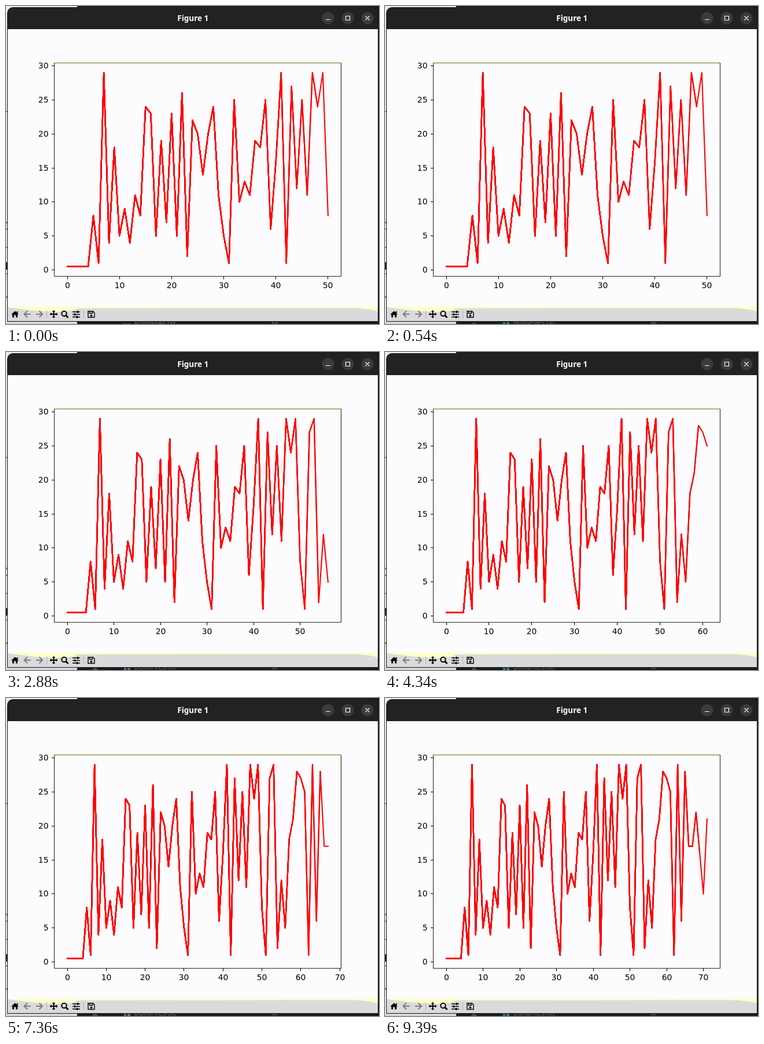
Recreate the animation shown at these times as an HTML page. Size 645x550 px, loop 9.94 s.

```html
<!DOCTYPE html>
<html lang="en">
<head>
<meta charset="utf-8">
<title>Live plot</title>
<style>
  html, body { margin: 0; width: 100%; height: 100%; overflow: hidden; background: #1b1b1d; }
  svg { display: block; }
  .tick { font: 13.9px "DejaVu Sans", sans-serif; fill: #000; }
  .title { font: bold 13.5px "Noto Sans", sans-serif; fill: #fff; }
  .file { font: 12px "Noto Sans", sans-serif; fill: #666; }
</style>
</head>
<body>
<svg width="645" height="550" viewBox="0 0 645 550">
  <!-- desktop behind the window -->
  <rect width="645" height="550" fill="#1b1b1d"/>
  <rect width="123" height="550" fill="#ececf0"/>
  <rect y="546" width="123" height="4" fill="#d6d6da"/>
  <g fill="#222">
    <path d="M0 182h3v1H0zM0 417h3v1H0zM0 463h3v1H0zM0 443h2v13H0z"/>
    <path d="M0 373h3v3H0zM0 502h3v3H0z" fill="#8a8a20"/>
    <path d="M0 385h3v2H0z" fill="#3a8fa0"/>
  </g>
  <g id="behind">
    <circle cx="154" cy="551" r="5" fill="#4a4a50"/>
    <path d="M204 545h4v5h-4zM210 545h5v5h-5z" fill="#3c7686"/>
    <text class="file" x="222" y="549">BuildFiles.txt</text>
    <text class="file" x="459" y="549">M</text>
  </g>

  <!-- window -->
  <path d="M2 546V14Q2 2 14 2H632Q644 2 644 14V546z" fill="#19191a"/>
  <path d="M3 39V14Q3 2 15 2H631Q643 2 643 14V39z" fill="#222223"/>
  <rect x="3" y="40" width="640" height="480" fill="#fcfcfe"/>
  <text class="title" x="323.3" y="26" text-anchor="middle">Figure 1</text>
  <g fill="#3b3b3b">
    <circle cx="557" cy="21" r="10.5"/>
    <circle cx="591" cy="21" r="10.5"/>
    <circle cx="625" cy="21" r="10.5"/>
  </g>
  <path d="M553 23.5h8M587.5 17.5h7v7h-7zM621.5 17.5l7 7m0-7l-7 7" fill="none" stroke="#fff" stroke-width="1.2"/>

  <!-- toolbar -->
  <rect x="3" y="520" width="640" height="25" fill="#ffffc6"/>
  <path d="M3 521Q50 528 90 529Q112 529 125 523L600 522.5Q625 523 643 528V545H3z" fill="#dadadc"/>
  <path d="M70.5 526v14M134.5 526v14" stroke="#b4b4b4"/>
  <path d="M15.5 527.5l6.5 6h-2v5h-3v-4h-3v4h-3v-5h-2zM18.5 528h2v3h-2z"/>
  <g fill="none" stroke="#7c7c7c" stroke-width="2">
    <path id="arrow" d="M37 527.5l-5.5 5.5 5.5 5.5M32 533h10.500"/>
    <use href="#arrow" transform="matrix(-1 0 0 1 94.5 0)"/>
  </g>
  <g fill="none" stroke="#000" stroke-width="2">
    <path d="M78 533h9M82.5 528.5v9"/>
    <circle cx="100.5" cy="532" r="4.2"/>
    <path d="M103.5 535l4 4" stroke-width="2.6"/>
    <path d="M115 529h13M115 533.5h13M115 538h13" stroke-width="1.3"/>
    <path d="M124 527v4M119 531.5v4M123 536v4"/>
    <path d="M142 528h8.5l2.5 2.5v8h-11zM144.500 528v3.5h5V528" stroke-width="1.4"/>
  </g>
  <path d="M82.5 526l2.8 3h-5.6zM82.5 540l2.8-3h-5.6zM75.5 533l3-2.8v5.6zM89.5 533l-3-2.8v5.6z"/>
  <circle cx="147.5" cy="535.5" r="1.9"/>

  <!-- plot -->
  <g id="line" fill="none" stroke="#f00" stroke-width="2.08" stroke-linejoin="round" stroke-linecap="square"></g>
  <path d="M83.5 98.5V467.5H579.5V98.5" fill="none" stroke="#2a2a14" stroke-width="1.1"/>
  <path d="M83 98.5H580" stroke="#6c6c08" stroke-width="1.1"/>
  <g id="yAxis"></g>
  <g id="xAxis"></g>
</svg>
<script>
const LOOP = 9940;
const LEFT = 106, SPAN = 450.9, ZERO = 456.6, UNIT = 11.77;

// The plotted readings: a flat start, then the sampled values.
const data = [
  ...Array(5).fill(.5),
  8, 1, 29, 4, 18, 5, 9, 4, 11, 8, 24, 23, 5, 19, 7, 23, 5, 26, 2, 22, 20, 14,
  20, 24, 11, 5, 1, 25, 10, 13, 11, 19, 18, 25, 6, 16, 29, 1, 27, 12, 25, 11,
  29, 24, 29, 8, 1, 27, 29, 2, 12, 5, 18, 21, 28, 27, 25, 1, 29, 6, 28, 17, 17,
  22, 16, 10, 21
];

// Index of the newest reading: an uneven start, then two more per redraw.
function newest(t) {
  if (t < 900) return 50;
  if (t < 1220) return 53;
  if (t < 2880) return 55;
  if (t < 3330) return 56;
  return 59 + 2 * Math.floor((t - 3330) / 1005);
}

const $ = id => document.getElementById(id);
const yOf = v => ZERO - v * UNIT;
const label = (x, y, anchor, text) =>
  `<text class="tick" x="${x}" y="${y}" text-anchor="${anchor}">${text}</text>`;
const tick = d => `<path d="${d}" stroke="#000" stroke-width="1.1"/>`;

let yMarks = '';
for (let v = 0; v <= 30; v += 5) {
  const y = Math.floor(yOf(v));
  yMarks += tick(`M79 ${y + .5}h4.5`) + label(73.5, y + 5, 'end', v);
}
$('yAxis').innerHTML = yMarks;

function plot(last) {
  const xOf = i => LEFT + i * SPAN / last;
  const points = data.slice(0, last + 1).map((v, i) => `${xOf(i).toFixed(2)},${yOf(v).toFixed(2)}`);

  // Earlier redraws lie under the newest one and thicken the older part.
  let lines = '';
  for (let end = last + 1; end > last - 20; end -= 2) {
    lines += `<polyline points="${points.slice(0, end).join(' ')}"/>`;
  }
  $('line').innerHTML = lines;

  let marks = '';
  for (let v = 0; v <= last * 1.05; v += 10) {
    const x = Math.floor(xOf(v)) + .5;
    marks += tick(`M${x} 467.5v5`) + label(x, 488, 'middle', v);
  }
  $('xAxis').innerHTML = marks;
}

let shown;
function frame() {
  const t = performance.now() % LOOP;
  const last = newest(t);
  if (last !== shown) plot(shown = last);
  const slide = 4 * (1 - Math.min(1, Math.max(0, (t - 30) / 990)));
  $('behind').setAttribute('transform', `translate(0 ${slide.toFixed(2)})`);
  requestAnimationFrame(frame);
}
frame();
</script>
</body>
</html>
```
